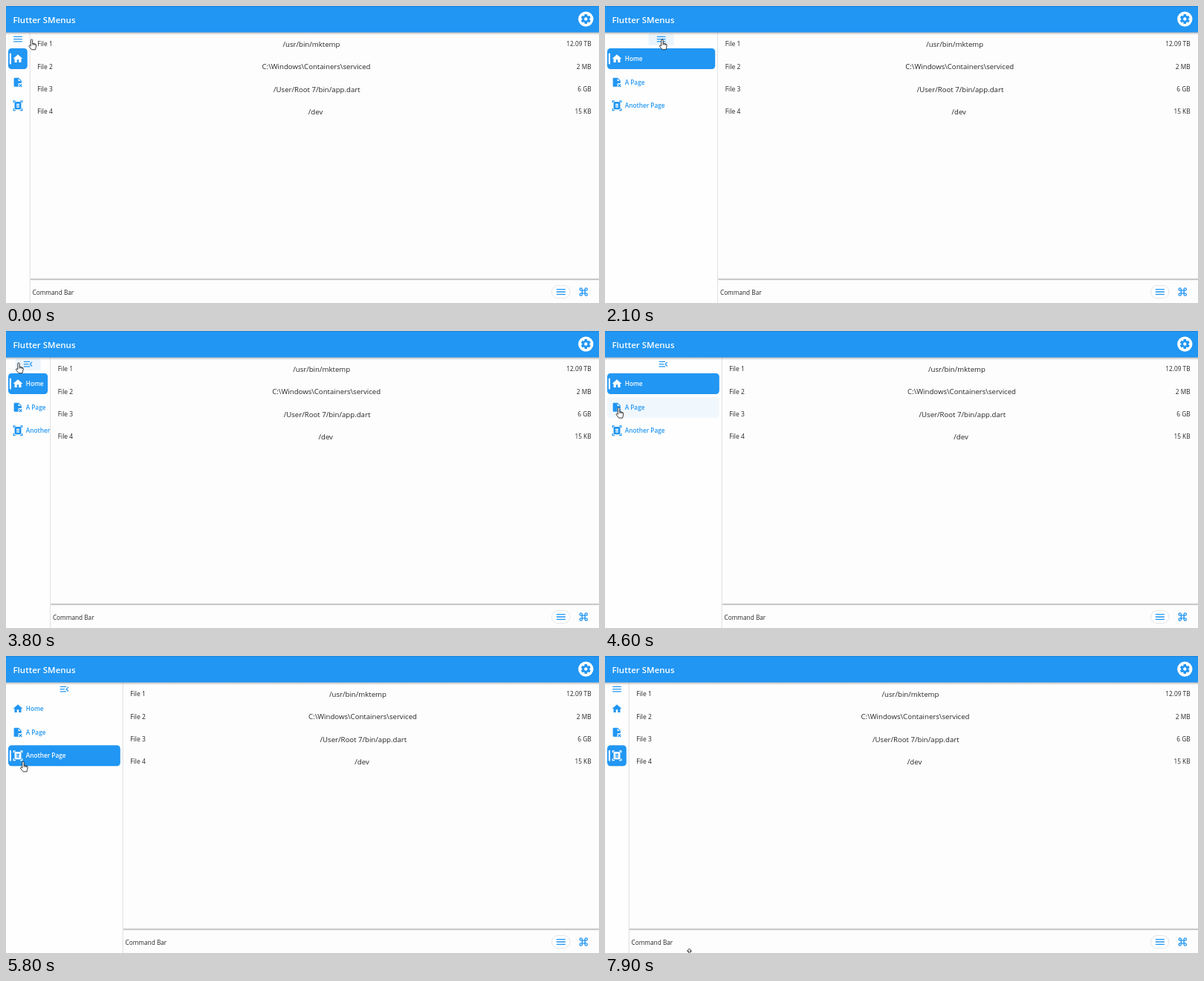
An HTML page for the animation above (8000 ms loop, 798 px wide and 400 px high).

```html
<!DOCTYPE html>
<html lang="en">
<head>
<meta charset="utf-8">
<title>Flutter SMenus</title>
<style>
  html, body { margin: 0; width: 100%; height: 100%; overflow: hidden; background: #fefdfe; }
  svg { display: block; width: 100vw; height: 100vh; }
  text { font-family: "Open Sans", "Noto Sans", sans-serif; fill: #262626; white-space: pre; }
  .label { font-size: 8.25px; font-weight: 600; }
</style>
</head>
<body>
<svg id="stage" viewBox="0 0 798 400">
  <defs>
    <linearGradient id="shade" x2="0" y2="1">
      <stop stop-color="#000" stop-opacity=".3"/>
      <stop offset="1" stop-color="#000" stop-opacity="0"/>
    </linearGradient>
    <clipPath id="sideClip"><rect id="sideClipBox" y="36" height="364"/></clipPath>
  </defs>
  <rect width="798" height="400" fill="#fefdfe"/>
  <g id="content"></g>
  <g id="sidebar" clip-path="url(#sideClip)"></g>
  <g id="appBar"></g>
  <g id="pointer"></g>
</svg>
<script>
const BLUE = '#2196f3', LOOP = 8000, NARROW = 32, WIDE = 157;
const $ = id => document.getElementById(id);

const ICONS = {
  menu: 'M3 18h18v-2H3zM3 13h18v-2H3zM3 6v2h18V6z',
  menuOpen: 'M3 18h13v-2H3zM3 13h10v-2H3zM3 6v2h13V6zM21 15.6L17.4 12 21 8.4 19.6 7l-5 5 5 5z',
  home: 'M10 20v-6h4v6h5v-8h3L12 3 2 12h3v8z',
  page: 'M5 2h9l6 6v6h-7v8H5q-2 0-2-2V4q0-2 2-2zM13 3.5V9h5.5zM15.4 15.5l2.4 2.4 2.4-2.4 1.4 1.4-2.4 2.4 2.4 2.4-1.4 1.4-2.4-2.4-2.4 2.4-1.4-1.4 2.4-2.4-2.4-2.4z',
  scanner: 'M7 3H4v3H2V1h5zM22 6V1h-5v2h3v3zM7 21H4v-3H2v5h5zM20 18v3h-3v2h5v-5zM19 18q0 2-2 2H7q-2 0-2-2V6q0-2 2-2h10q2 0 2 2zM15 8H9v2h6zM15 11H9v2h6zM15 14H9v2h6z',
  command: 'M9 9V6.5A2.5 2.5 0 1 0 6.5 9H17.5A2.5 2.5 0 1 0 15 6.5V17.5A2.5 2.5 0 1 0 17.5 15H6.5A2.5 2.5 0 1 0 9 17.5Z'
};

function add(parent, tag, attrs = {}, text) {
  const el = document.createElementNS('http://www.w3.org/2000/svg', tag);
  set(el, attrs);
  if (text) el.textContent = text;
  return parent.appendChild(el);
}
function set(el, attrs) {
  for (const key in attrs) el.setAttribute(key, attrs[key]);
}
const at = (x, y, scale = 1) => `translate(${x} ${y}) scale(${scale})`;
function icon(parent, name, x, y, scale = .65) {
  const g = add(parent, 'g', { transform: at(x, y, scale) });
  add(g, 'path', { d: ICONS[name], transform: 'translate(-12 -12)', fill: BLUE, 'fill-rule': 'evenodd' });
  return g;
}

// App bar
const appBar = $('appBar');
add(appBar, 'rect', { y: 35, width: 798, height: 4, fill: 'url(#shade)' });
add(appBar, 'rect', { width: 798, height: 35.5, fill: BLUE });
add(appBar, 'rect', { width: 798, height: .8, fill: '#000', opacity: .15 });
add(appBar, 'text', { x: 9.5, y: 23, 'font-size': 11.5, 'font-weight': 600, style: 'fill:#fff' }, 'Flutter SMenus');
const gear = add(appBar, 'g', { transform: at(780.3, 17.6) });
add(gear, 'circle', { r: 10.2, fill: '#fff' });
for (let a = 0; a < 360; a += 60)
  add(gear, 'rect', { x: -1.8, y: -6.5, width: 3.6, height: 4, rx: .5, fill: BLUE, transform: `rotate(${a})` });
add(gear, 'circle', { r: 3.6, fill: 'none', stroke: BLUE, 'stroke-width': 2.7 });

// File list and command bar
const content = $('content');
const rows = [
  ['File 1', '/usr/bin/mktemp', '12.09 TB', 51, 411],
  ['File 2', 'C:\\Windows\\Containers\\serviced', '2 MB', 81.5, 417.5],
  ['File 3', '/User/Root 7/bin/app.dart', '6 GB', 112, 418.3],
  ['File 4', '/dev', '15 KB', 142, 416.5]
].map(([name, path, size, y, mid]) => {
  add(content, 'text', { x: 787.6, y: y + 3, 'font-size': 8.3, 'text-anchor': 'end' }, size);
  return {
    mid,
    name: add(content, 'text', { y: y + 3.1, 'font-size': 8.5 }, name),
    path: add(content, 'text', { y: y + 3.7, 'font-size': 9.65, 'text-anchor': 'middle' }, path)
  };
});
const divider = add(content, 'rect', { y: 367, width: 798, height: 2.2, fill: '#c9c9cb' });
const barLabel = add(content, 'text', { y: 388.6, 'font-size': 8.25 }, 'Command Bar');
add(content, 'rect', { x: 734.5, y: 376.5, width: 24.5, height: 17, rx: 8.5, fill: '#fff', stroke: '#dcdfe3', 'stroke-width': .8 });
icon(content, 'menu', 746.8, 385, .67);
set(icon(content, 'command', 777.2, 385, .64).firstChild, { fill: 'none', stroke: BLUE, 'stroke-width': 2.1 });

// Sidebar
const sidebar = $('sidebar');
add(sidebar, 'rect', { y: 36, width: 158, height: 364, fill: '#fefefe' });
const edge = add(sidebar, 'rect', { y: 36, width: 1, height: 364, fill: '#dedee0' });
const headHover = add(sidebar, 'rect', { y: 37, height: 16, rx: 2, fill: '#ebf4fc' });
const menuIcon = icon(sidebar, 'menu', 16, 44.7);
const openIcon = icon(sidebar, 'menuOpen', 78.5, 44.7);
const items = [['Home', 'home', 71], ['A Page', 'page', 102.8], ['Another Page', 'scanner', 134.2]]
  .map(([text, glyph, y]) => ({
    y,
    box: add(sidebar, 'rect', { x: 3, y: y - 14, height: 28, rx: 4.5 }),
    mark: add(sidebar, 'rect', { x: 4.8, y: y - 7.5, width: 2.2, height: 15, rx: 1.1, fill: '#fff' }),
    glyph: icon(sidebar, glyph, 16, y, glyph === 'page' ? .6 : .64).firstChild,
    label: add(sidebar, 'text', { class: 'label', x: 26.7, y: y + 3.1 }, text)
  }));

// Pointers, each with its tip at the origin
const outline = { fill: '#fff', stroke: '#222', 'stroke-width': .9, 'stroke-linejoin': 'round' };
const pointer = $('pointer');
const hand = add(pointer, 'path', { ...outline, transform: 'translate(-4.2 0)',
  d: 'M3 1.2a1.2 1.2 0 0 1 2.4 0V5.3l3.6.8q1.6.4 1.4 2l-.6 3.4-.6 2.3H4.3L.9 9.6q-.6-1 .3-1.5t1.8.8zM5.4 5.3v2.2M7.2 5.7v2M8.9 6.1v1.8' });
const arrow = add(pointer, 'path', { ...outline, d: 'M0 0V11l2.6-2.4 1.7 3.9 1.6-.7-1.7-3.8H7.6z' });
const resize = add(pointer, 'path', { ...outline, d: 'M0 0L3 3.5H1V10H3L0 13.5-3 10H-1V3.5H-3z' });

const smooth = u => u * u * (3 - 2 * u);
const clamp = u => Math.max(0, Math.min(1, u));

// Keys are [time, value, value...]
function track(keys, t, ease = smooth) {
  const i = keys.findIndex(k => k[0] > t);
  if (i < 0) return keys[keys.length - 1].slice(1);
  if (i === 0) return keys[0].slice(1);
  const a = keys[i - 1], b = keys[i], u = ease((t - a[0]) / (b[0] - a[0]));
  return a.slice(1).map((v, n) => v + (b[n + 1] - v) * u);
}

const TIP = [
  [0, 34.5, 45], [300, 17, 42], [650, 16, 43], [900, 16.5, 47.3], [1100, 17, 48], [1700, 77, 44],
  [2200, 77, 45], [2700, 31, 54.5], [2850, 31, 54.5], [3100, 17, 42], [3900, 17, 43], [4500, 18.5, 103.3],
  [4900, 19, 103.5], [5350, 22.3, 140], [5800, 23, 142], [6300, 73.5, 50], [6500, 73, 51.3],
  [6900, 73, 52], [7300, 78, 70], [7800, 113.5, 394]
];
const HEAD = [
  [150, 0], [250, 1], [850, 1], [1000, 0], [1500, 0], [1600, 1], [2500, 1], [2650, 0], [2950, 0],
  [3050, 1], [3900, 1], [4050, 0], [6150, 0], [6250, 1], [6800, 1], [6950, 0]
];
const TOGGLES = [300, 2050, 3680, 6615], SLIDE = 400;

function draw(t) {
  let spread = 0, open = false;
  for (const start of TOGGLES) {
    if (t < start) break;
    open = !open;
    const u = smooth(clamp((t - start) / SLIDE));
    spread = open ? u : 1 - u;
  }
  const w = NARROW + (WIDE - NARROW) * spread, middle = w / 2;
  const [x, y] = track(TIP, t);
  const selected = t < 4900 ? 0 : t < 5700 ? 1 : 2;

  set($('sideClipBox'), { width: w + 1 });
  set(edge, { x: w - .3 });
  set(divider, { x: w });
  set(barLabel, { x: w + 3.5 });
  for (const row of rows) {
    set(row.name, { x: w + 10.3 });
    set(row.path, { x: row.mid + (w - NARROW) / 2 });
  }

  const headWidth = Math.min(34, w - 3);
  set(headHover, { x: middle - headWidth / 2, width: headWidth, opacity: track(HEAD, t, u => u)[0] });
  set(menuIcon, { transform: at(middle, 44.7, .65), opacity: open ? 0 : 1 });
  set(openIcon, { transform: at(middle, 44.7, .65), opacity: open ? 1 : 0 });

  items.forEach((item, i) => {
    const on = i === selected;
    const hover = !on && x < w && Math.abs(y - item.y) < 14;
    const tint = on ? '#fff' : BLUE;
    set(item.box, { width: w - 6.2, fill: on ? BLUE : hover ? '#f1f8fd' : 'none' });
    set(item.mark, { opacity: on ? 1 : 0 });
    set(item.glyph, { fill: tint });
    item.label.style.fill = tint;
    set(item.label, { opacity: clamp((w - NARROW) / 25) });
  });

  const shape = t < 7350 ? hand : y > 360 ? resize : arrow;
  for (const p of [hand, arrow, resize]) set(p, { opacity: p === shape ? 1 : 0 });
  set(pointer, { transform: at(x, y) });
}

const begin = performance.now();
function tick() {
  draw((performance.now() - begin) % LOOP);
  requestAnimationFrame(tick);
}
tick();
</script>
</body>
</html>
```
